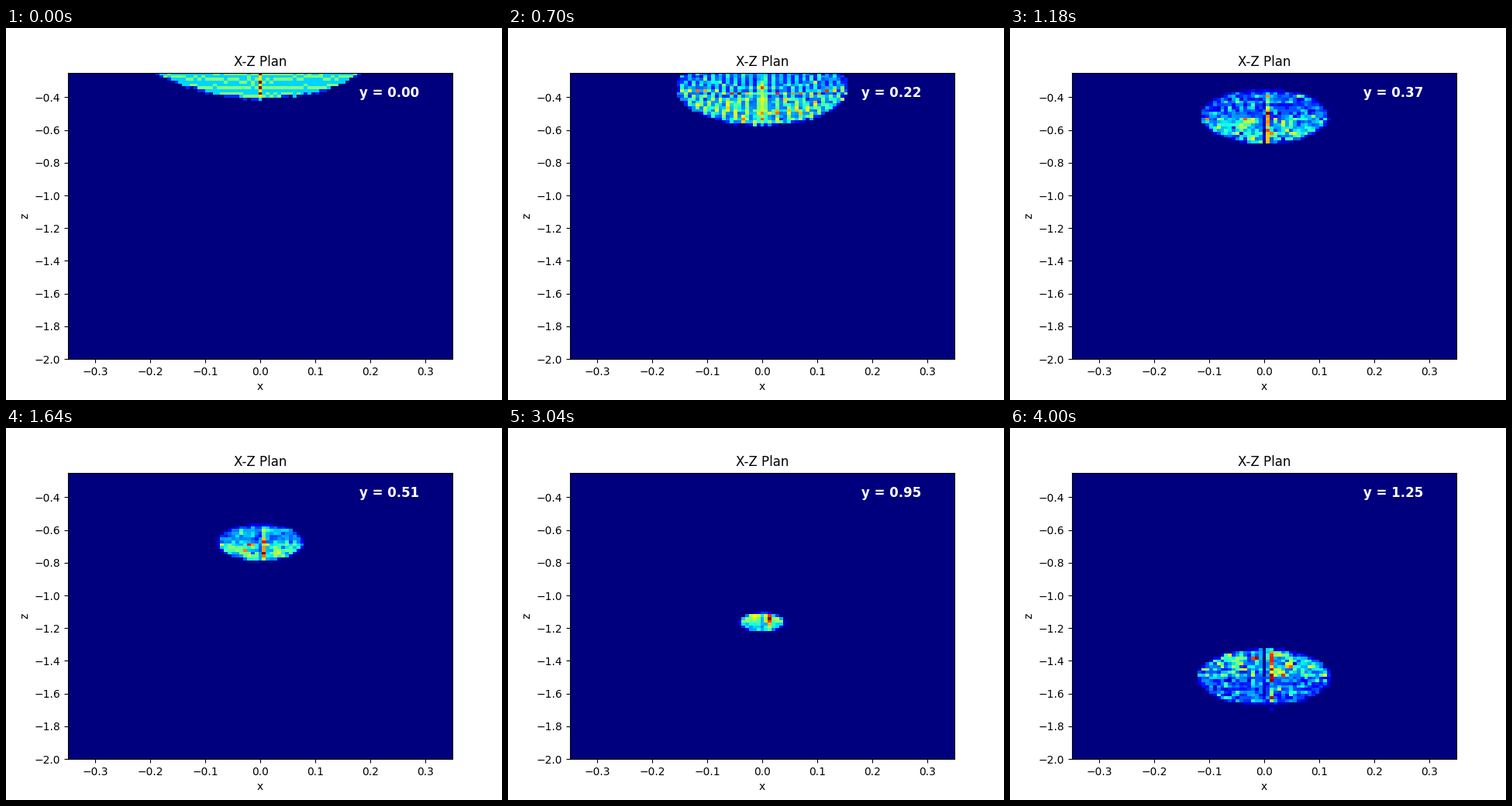
Write a matplotlib script that moves like this. It is 640 px wide and 480 px high and loops after 4020 ms.

```python
import numpy as np
import matplotlib.pyplot as plt
from matplotlib.animation import FuncAnimation

FRAMES, INTERVAL = 201, 20
CELLS = 101
X_LIM, Z_LIM = (-0.35, 0.35), (-2.0, -0.25)
Y_STEP = 1 / 160
FOCUS_Y = 0.80
SEAM_ROW = 35

plt.rcParams["font.family"] = "DejaVu Sans"


def make_rays():
    """Lattice of rays in the unit disk: column, u, v, weight and clumping."""
    rng = np.random.default_rng(4)
    n = np.arange(63)
    i, row = np.meshgrid(np.arange(-33, 34), n)
    v = 1 - 0.024 * row - 0.0003 * np.maximum(0, row - 21) ** 2
    u = 0.031 * i * (1 + 0.1 * v)

    # clumps about one cell wide, plus arms running outwards from the middle
    patch = rng.normal(0, 0.42, (17, 35))[row // 4, (i + 33) // 2]
    arms = 0.3 * np.cos(30 * np.arctan2(u, v))
    clump = np.exp(patch + arms - 0.12)

    weight = np.ones(i.shape)
    weight[i == 0] = 2
    weight[(row == SEAM_ROW) & (i % 3 == 0)] = 4

    inside = u**2 + v**2 <= 1 + rng.normal(0, 0.03, u.shape)
    i, u, v, weight, clump = (a[inside] for a in (i, u, v, weight, clump))
    v = v - 0.04 * u**2 * (1 - v**2) + rng.normal(0, 0.003, v.size)
    u = u + rng.normal(0, 0.002, u.size) * (i != 0)
    return i, u, v, weight, clump


COL, U, V, WEIGHT, CLUMP = make_rays()


def density(y):
    """Ray counts in the x-z plane at depth y, and the top of the colour scale."""
    scale = 0.265 * (FOCUS_Y - y)
    center = -0.109 - 1.113 * y
    rough = min(1, (y / 0.37) ** 2)
    x = np.where(COL == 0, 0.0115 * y, scale * U)
    z = center - 1.42 * scale * V
    w = WEIGHT * (1 + rough * (CLUMP - 1))
    if scale < -0.05:
        # one ray strays beyond the lower rim
        x = np.append(x, 0.0115 * y)
        z = np.append(z, center + 1.42 * scale * 1.18)
        w = np.append(w, 2)
    counts, _, _ = np.histogram2d(z, x, bins=CELLS, range=(Z_LIM, X_LIM), weights=w)
    top = np.ceil(5.2 * (1 + 0.25 * rough) * 0.212**2 / max(scale**2, 1e-6))
    return counts, max(1, min(counts.max(), top))


fig, ax = plt.subplots(figsize=(6.4, 4.8), dpi=100)
image = ax.imshow(np.zeros((CELLS, CELLS)), cmap="jet", origin="lower",
                  extent=(*X_LIM, *Z_LIM), aspect="auto",
                  interpolation="nearest", vmin=0, vmax=1)
label = ax.text(0.18, -0.4, "", color="white", fontsize=12, fontweight="bold")
ax.set_title("X-Z Plan")
ax.set_xlabel("x")
ax.set_ylabel("z")


def update(n):
    y = n * Y_STEP
    counts, top = density(y)
    image.set_data(counts)
    image.set_clim(0, top)
    label.set_text(f"y = {y:.2f}")
    return image, label


anim = FuncAnimation(fig, update, frames=FRAMES, interval=INTERVAL,
                     repeat=True, repeat_delay=0, blit=False)
plt.show()
```
